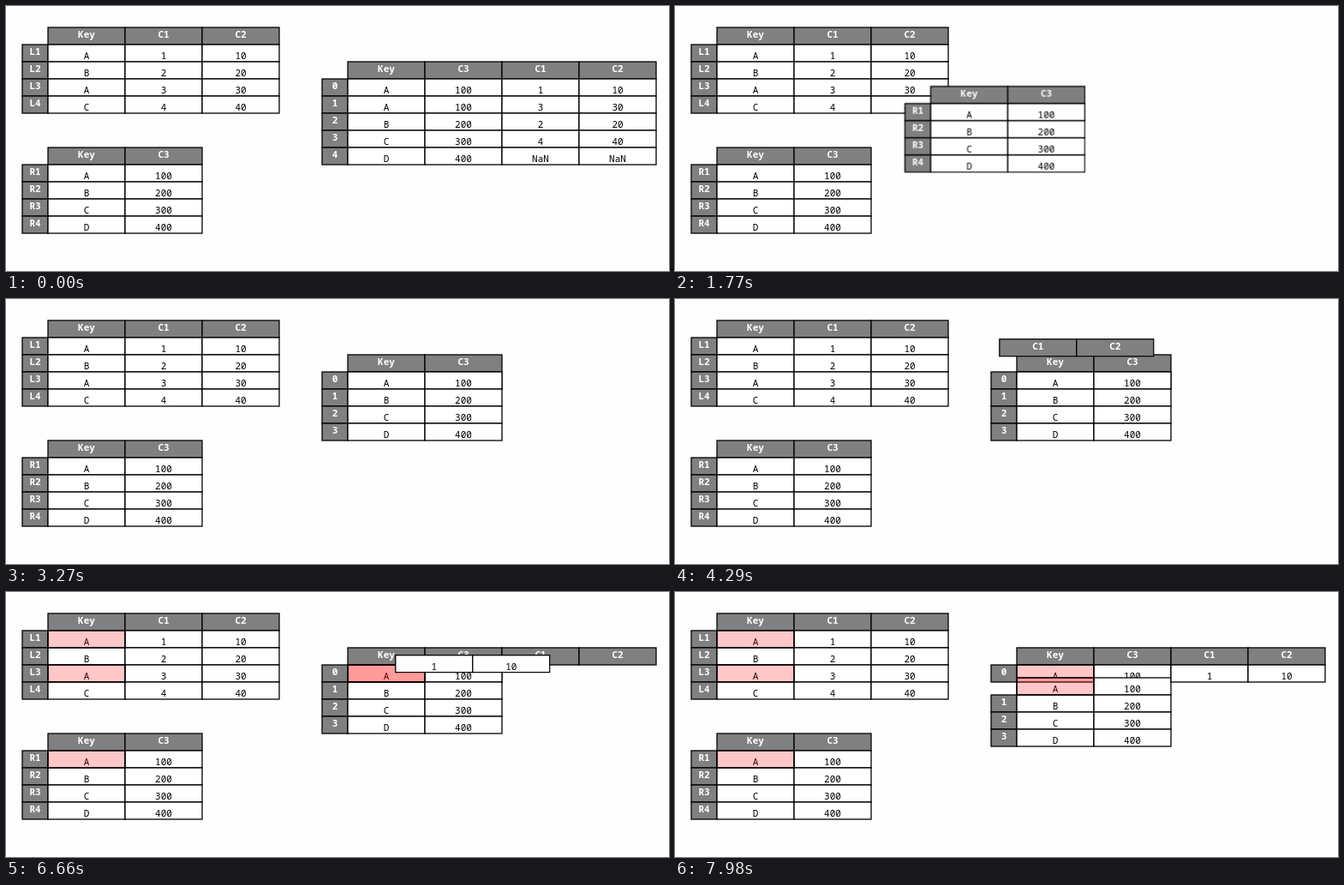
Write an HTML page that moves like this. It is 774x309 px and loops after 8 s.

```html
<!DOCTYPE html>
<html lang="en">
<head>
<meta charset="utf-8">
<title>Right join of two tables</title>
<style>
  html, body { margin: 0; width: 100%; height: 100%; overflow: hidden; background: #fefefe; }
  svg { display: block; width: 774px; height: 309px; }
  rect { stroke: #000; stroke-width: 1.3; fill: #fff; }
  .dark rect { fill: #808080; }
  text { font: 11px "Noto Sans Mono", "DejaVu Sans Mono", monospace; text-anchor: middle; }
  .dark text { fill: #fff; font-weight: 600; }
  .mark { fill: rgb(255 0 0 / .22); }

  .result, .copy, .heads, .values, .shift, .old, .new, .mark {
    animation: 8s step-end infinite both;
  }
  .result { animation-name: result; }
  .copy { animation-name: copy; }
  .old { animation-name: old; }
  .new { animation-name: new; }
  .heads { animation-name: heads; }
  .mark { animation-name: mark; }
  .values { animation-name: values; }
  .shift { animation-name: shift; }

  @keyframes result {
    0% { opacity: 1; }
    9%, 100% { opacity: 0; }
  }
  @keyframes copy {
    0% { opacity: 0; transform: none; }
    14.0625% { opacity: 1; transform: translate(20.8px, -5.94px); animation-timing-function: steps(15, end); }
    25.025% { opacity: 1; transform: translate(332.6px, -95.04px); }
    25.6875%, 100% { opacity: 1; transform: translate(350px, -100px); }
  }
  @keyframes old {
    0% { opacity: 1; }
    32.8125% { opacity: 1; animation-timing-function: steps(8, start); }
    41.95%, 100% { opacity: 0; }
  }
  @keyframes new {
    0% { opacity: 0; }
    32.8125% { opacity: 0; animation-timing-function: steps(8, start); }
    41.95%, 100% { opacity: 1; }
  }
  @keyframes heads {
    0% { opacity: 0; transform: none; }
    47.0625% { opacity: 1; transform: translate(4.6px, .42px); animation-timing-function: steps(16, end); }
    58.5825% { opacity: 1; transform: translate(422.8px, 38.44px); }
    59.3125%, 100% { opacity: 1; transform: translate(440px, 40px); }
  }
  @keyframes mark {
    0% { opacity: 0; }
    65.7%, 100% { opacity: 1; }
  }
  @keyframes values {
    0% { opacity: 0; transform: none; }
    75.0625% { opacity: 1; transform: translate(11.9px, 1.08px); animation-timing-function: steps(13, end); }
    84.6875% { opacity: 1; transform: translate(371px, 33.73px); }
    85.8125% { opacity: 1; transform: translate(400px, 36.4px); }
    86.5625% { opacity: 1; transform: translate(427px, 38.8px); }
    87.1875%, 100% { opacity: 1; transform: translate(440px, 40px); }
  }
  @keyframes shift {
    0% { transform: none; }
    93.1875% { transform: translateY(1.67px); animation-timing-function: steps(8, end); }
    99.6875%, 100% { transform: translateY(15px); }
  }
</style>
</head>
<body>
<svg id="stage" viewBox="0 0 774 309"></svg>
<script>
  const ROW = 20, COL = 90, INDEX = 30;
  const stage = document.getElementById('stage');

  function add(parent, tag, attrs = {}, text = '') {
    const node = document.createElementNS('http://www.w3.org/2000/svg', tag);
    for (const name in attrs) node.setAttribute(name, attrs[name]);
    node.textContent = text;
    return parent.appendChild(node);
  }

  const group = (parent, name) => add(parent, 'g', { class: name });

  function cell(parent, x, y, width, label, dark) {
    const g = group(parent, dark ? 'dark' : 'light');
    add(g, 'rect', { x, y, width, height: ROW });
    add(g, 'text', { x: x + width / 2, y: y + (dark ? 12 : 17) }, label);
    return g;
  }

  function row(parent, x, y, labels, dark) {
    labels.forEach((label, i) => cell(parent, x + i * COL, y, COL, label, dark));
  }

  function table(parent, x, y, index, head, rows) {
    row(parent, x + INDEX, y, head, true);
    rows.forEach((labels, i) => {
      const top = y + (i + 1) * ROW;
      cell(parent, x, top, INDEX, index[i], true);
      row(parent, x + INDEX, top, labels);
    });
  }

  // Index cell whose label fades into its row number.
  function renumbered(parent, x, y, from, to) {
    const g = cell(parent, x, y, INDEX, from, true);
    g.lastChild.setAttribute('class', 'old');
    add(g, 'text', { x: x + INDEX / 2, y: y + 12, class: 'new' }, to);
  }

  const mark = (parent, x, y) =>
    add(parent, 'rect', { class: 'mark', x, y, width: COL, height: ROW });

  const left = [['A', 1, 10], ['B', 2, 20], ['A', 3, 30], ['C', 4, 40]];
  const right = [['A', 100], ['B', 200], ['C', 300], ['D', 400]];
  const joined = [['A', 100, 1, 10], ['A', 100, 3, 30], ['B', 200, 2, 20],
                  ['C', 300, 4, 40], ['D', 400, 'NaN', 'NaN']];

  table(stage, 19, 25, ['L1', 'L2', 'L3', 'L4'], ['Key', 'C1', 'C2'], left);
  table(stage, 19, 165, ['R1', 'R2', 'R3', 'R4'], ['Key', 'C3'], right);
  [45, 85, 185].forEach(y => mark(stage, 49, y));

  // Copy of the right table; its lower layer stays while the upper one slides down.
  const copy = group(stage, 'copy');
  row(copy, 49, 165, ['Key', 'C3'], true);
  renumbered(copy, 19, 185, 'R1', 0);
  row(copy, 49, 185, right[0]);
  const shift = group(copy, 'shift');
  right.forEach((labels, i) => {
    const y = 185 + i * ROW;
    if (i) renumbered(shift, 19, y, 'R' + (i + 1), i);
    row(shift, 49, y, labels);
  });
  mark(copy, 49, 185);
  mark(group(copy, 'shift'), 49, 185);

  row(group(stage, 'heads'), 139, 25, ['C1', 'C2'], true);
  row(group(stage, 'values'), 139, 45, [1, 10]);

  table(group(stage, 'result'), 369, 65, [0, 1, 2, 3, 4], ['Key', 'C3', 'C1', 'C2'], joined);
</script>
</body>
</html>
```
